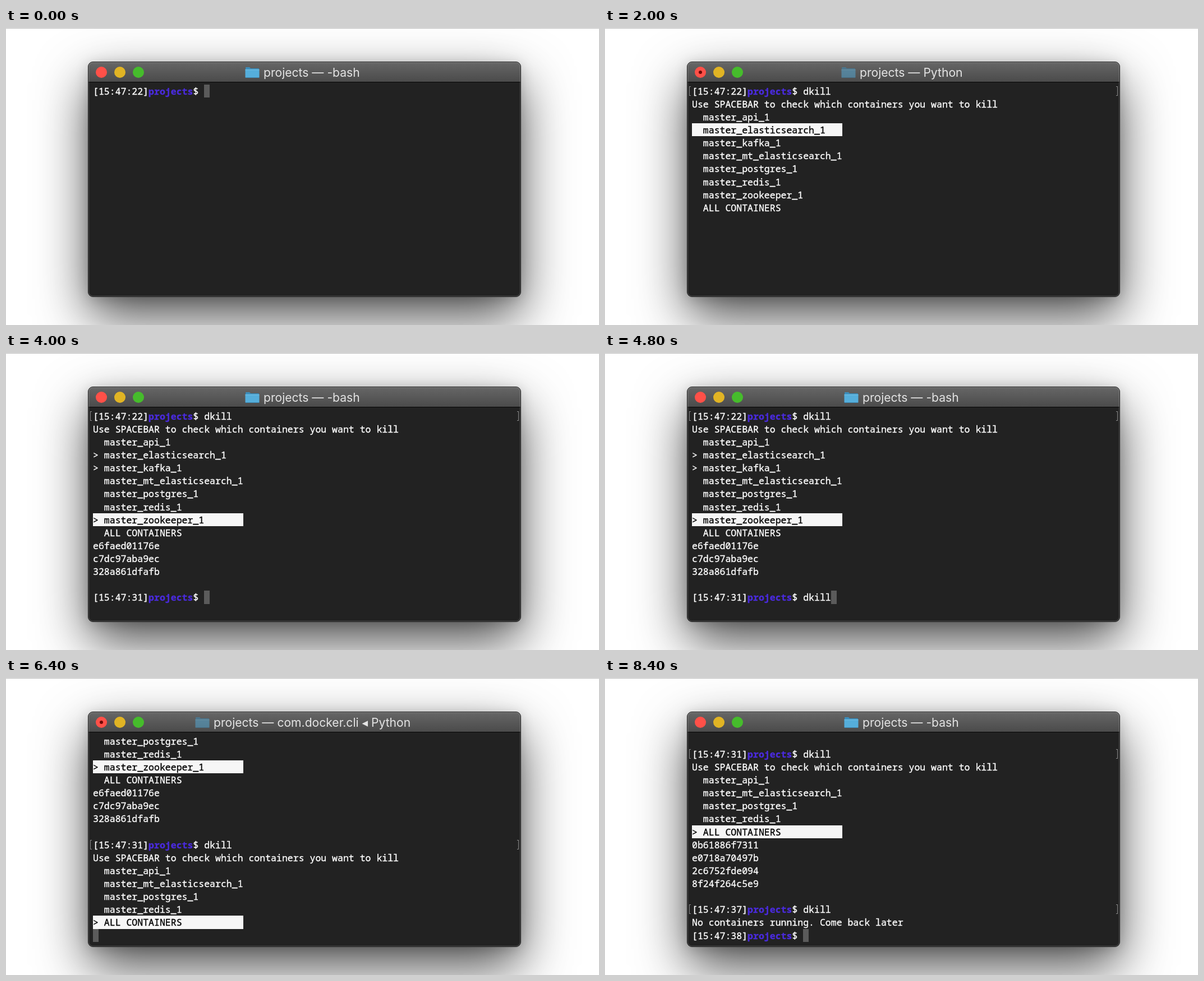
Animation of 1057 by 530 pixels, one loop 8600 ms. Source, as an HTML page:

```html
<!DOCTYPE html>
<html lang="en">
<head>
<meta charset="utf-8">
<title>Terminal</title>
<style>
  html, body { margin: 0; width: 100%; height: 100%; overflow: hidden; background: #fff; }
  #stage { position: relative; width: 1057px; height: 530px; overflow: hidden; background: #fff; }
  #stage::before { content: ""; position: absolute; inset: 0 0 auto; height: 1px; background: #bcbcbc; }
  #stage div, #stage svg { position: absolute; }
  #window {
    left: 146px; top: 60px; width: 772px; height: 420px; box-sizing: border-box;
    border: 1px solid #161616; border-radius: 9px; background: #222; overflow: hidden;
  }
  #shadow {
    left: 147px; top: 61px; width: 770px; height: 418px; border-radius: 9px;
    box-shadow: 0 36px 92px rgba(0, 0, 0, .7), 0 4px 24px rgba(0, 0, 0, .18);
  }
  #rim {
    left: 147px; top: 61px; width: 770px; height: 418px; box-sizing: border-box;
    border: 1px solid rgba(255, 255, 255, .22); border-radius: 8px;
  }
  #bar {
    left: 0; top: 0; width: 100%; height: 35px;
    background: linear-gradient(#666, #4b4b4b); border-bottom: 1px solid #060606;
  }
  .light { top: 69px; width: 20px; height: 20px; border-radius: 50%; }
  #dot { left: 167px; top: 76px; width: 6px; height: 6px; border-radius: 50%; background: #6d0805; }
  #title {
    top: 67px; font: 21.1px/26px Inter, "DejaVu Sans", sans-serif;
    color: #e4e4e4; white-space: pre;
  }
  #folder { top: 69px; width: 26px; height: 21px; }
  #screen {
    left: 0; top: 0; font: 500 16.53px/23.13px "Noto Sans Mono", monospace;
    color: #fff; -webkit-text-stroke: .35px;
  }
  .row { left: 155px; height: 23.13px; white-space: pre; }
  .row b { color: #4a2bdc; font-weight: 800; }
  .sel { background: #f6f6f6; color: #000; }
  .cursor { display: inline-block; width: 10px; height: 23.13px; background: #5b5b5b; vertical-align: top; }
  .mark { width: 2px; height: 15px; border: 1px solid #8c8c8c; }
  .open { left: 150px; border-right: 0; }
  .close { left: 911px; border-left: 0; }
</style>
</head>
<body>
<div id="stage">
  <div id="shadow"></div>
  <div id="window"><div id="bar"></div></div>
  <div id="rim"></div>
  <div class="light" style="left:160px;background:#ff5048"></div>
  <div class="light" style="left:193px;background:#e1b424"></div>
  <div class="light" style="left:226px;background:#46bc2c"></div>
  <div id="dot"></div>
  <svg id="folder" viewBox="0 0 26 21">
    <path d="M1 4V2.2Q1 1 2.2 1H8L10 3H24Q25 3 25 4V8H1Z" fill="#3c8fbd"/>
    <path d="M.5 5H25.5V18.5Q25.5 20 24 20H2Q.5 20 .5 18.5Z" fill="#55aedb"/>
    <path d="M.5 5.5H25.5" stroke="#7cc5e8"/>
    <path d="M1 19.5H25" stroke="#3d8ab5"/>
  </svg>
  <div id="title"></div>
  <div id="screen"></div>
</div>
<script>
const LOOP = 8600, ROWS = 16, PITCH = 23.13, TOP = 100.6;
const $ = id => document.getElementById(id);

const TITLES = {
  bash: ["-bash", 459],
  python: ["Python", 454],
  docker: ["com.docker.cli ◂ Python", 370]
};
const HINT = "Use SPACEBAR to check which containers you want to kill";
const names = list => [...list.split(" ").map(n => `master_${n}_1`), "ALL CONTAINERS"];
const first = names("api elasticsearch kafka mt_elasticsearch postgres redis zookeeper");
const second = names("api mt_elasticsearch postgres redis");

const prompt = (time, typed = "", entered = false) => ({ time, text: typed, entered });
const run = time => prompt(time, "dkill", true);
const menu = (items, at, checked = []) => [HINT, ...items.map((name, i) => ({
  text: ((checked.includes(i) ? "> " : "  ") + name).padEnd(27),
  sel: i === at
}))];

const scenes = [];
const show = (ms, title, lines, cursor = true) => scenes.push({ ms, title, lines, cursor });

// First run: pick three containers
const t1 = "15:47:22", t2 = "15:47:31", t3 = "15:47:37", t4 = "15:47:38";
const type = (past, time, steps) =>
  steps.forEach(([ms, n]) => show(ms, "bash", [...past, prompt(time, "dkill".slice(0, n))]));
type([], t1, [[0, 0], [800, 1], [1000, 2], [1200, 4], [1400, 5]]);
show(1600, "python", [run(t1), ""]);
[
  [1800, 0], [2000, 1], [2200, 1, [1]], [2400, 2, [1, 2]],
  [2600, 4, [1, 2]], [2800, 6, [1, 2]], [3000, 6, [1, 2, 6]]
].forEach(([ms, at, checked]) =>
  show(ms, "python", [run(t1), ...menu(first, at, checked), ""], false));
const picked = [run(t1), ...menu(first, 6, [1, 2, 6])];
const killed = [...picked, "e6faed01176e", "c7dc97aba9ec", "328a861dfafb"];
show(3200, "docker", [...picked, ""]);
show(3800, "docker", [...killed, ""]);

// Second run: kill the rest
const past = [...killed, ""];
type(past, t2, [[4000, 0], [4400, 1], [4600, 3], [4800, 5]]);
[[5000, 0], [5200, 2], [5400, 3], [5600, 4], [5800, 4, [4]]].forEach(([ms, at, checked]) =>
  show(ms, "python", [...past, run(t2), ...menu(second, at, checked), ""], false));
const all = [...past, run(t2), ...menu(second, 4, [4])];
show(6000, "docker", [...all, ""]);

// Third run: nothing left
const empty = [...all, "0b61886f7311", "e0718a70497b", "2c6752fde094", "8f24f264c5e9", ""];
type(empty, t3, [[6800, 0], [7000, 1], [7200, 3], [7400, 5]]);
show(7600, "python", [...empty, run(t3), ""]);
show(7800, "bash", [...empty, run(t3), "No containers running. Come back later", prompt(t4)]);

function rowHtml(line, y, cursor) {
  const { text, time, sel, entered } = typeof line === "string" ? { text: line } : line;
  const lead = time ? `[${time}]<b>projects</b>$ ` : "";
  const block = cursor ? '<span class="cursor"></span>' : "";
  const marks = entered
    ? ["open", "close"].map(c => `<div class="mark ${c}" style="top:${y + 3}px"></div>`).join("") : "";
  return `<div class="row${sel ? " sel" : ""}" style="top:${y}px">` +
    lead + text.replace(">", "&gt;") + block + "</div>" + marks;
}

function draw({ title, lines, cursor }) {
  const [name, x] = TITLES[title], busy = title !== "bash";
  $("title").textContent = "projects — " + name;
  $("title").style.left = x + "px";
  $("folder").style.left = x - 33 + "px";
  $("folder").style.opacity = busy ? .5 : 1;
  $("dot").style.display = busy ? "block" : "none";
  const view = lines.slice(-ROWS);
  $("screen").innerHTML = view.map((line, i) =>
    rowHtml(line, TOP + i * PITCH, cursor && i === view.length - 1)).join("");
}

let current;
function tick() {
  const ms = performance.now() % LOOP;
  const scene = scenes.findLast(s => s.ms <= ms);
  if (scene !== current) draw(current = scene);
  requestAnimationFrame(tick);
}
tick();
</script>
</body>
</html>
```
